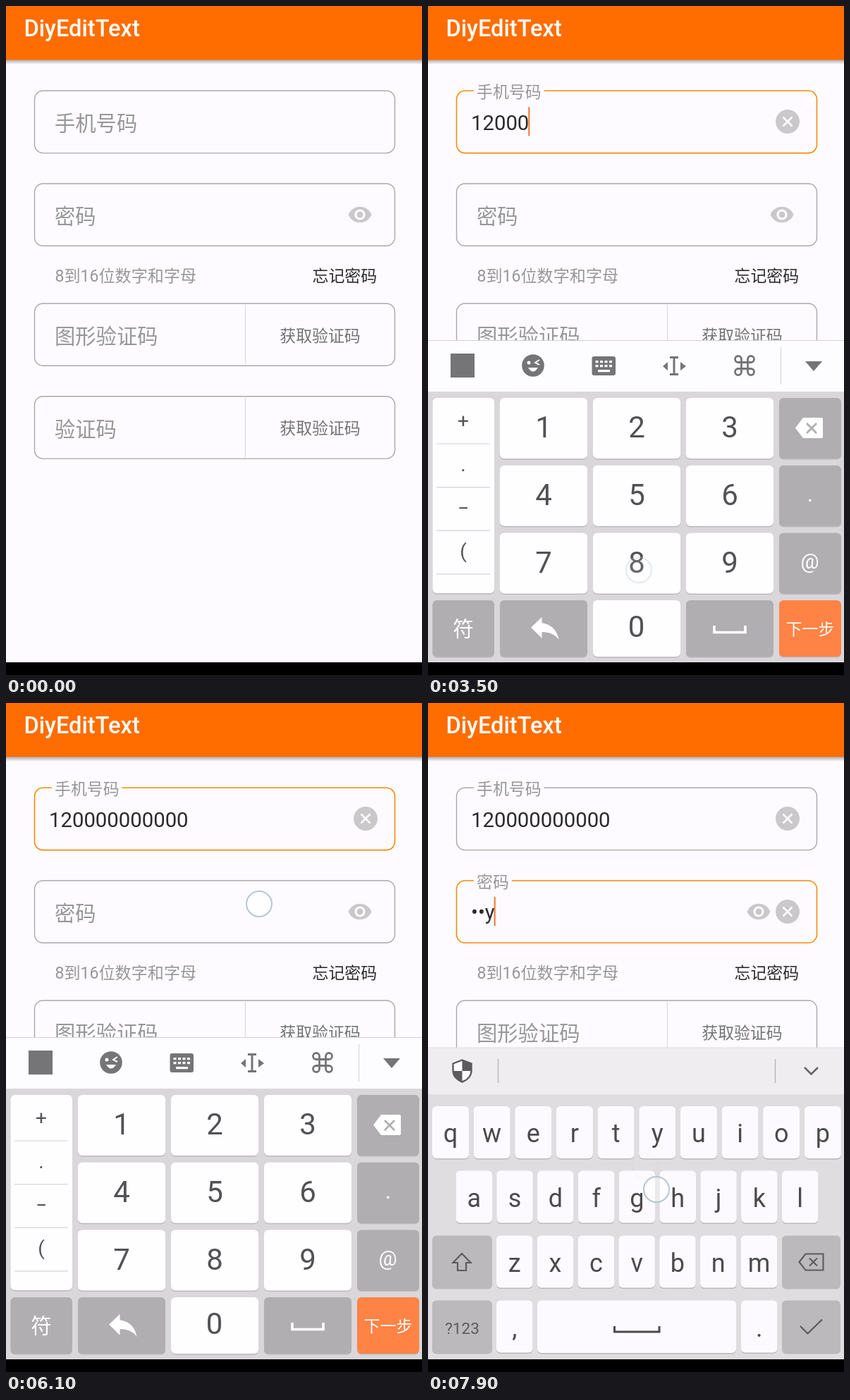
An HTML page for the animation above (8000 ms loop, 590 by 949 pixels).

```html
<!DOCTYPE html>
<html lang="zh-CN">
<head>
<meta charset="utf-8">
<title>DiyEditText</title>
<style>
html, body { margin: 0; width: 100%; height: 100%; overflow: hidden; background: #fdfbff; }
svg { display: block; width: 590px; height: 949px; font-family: Roboto, "Noto Sans CJK SC", "Noto Sans CJK", sans-serif; }
</style>
</head>
<body>
<svg id="stage" viewBox="0 0 590 949" xmlns="http://www.w3.org/2000/svg"></svg>
<script>
const LOOP = 8000, STEP = 100;
const PHONE = "120000000000";
const PAGE = "#fdfbff", LINE = "#a9a8aa", ACCENT = "#f58c0c", HINT = "#979698";
const BIG = 29.3, SMALL = 22.9;

// When each character appears
const phoneKeys = [1500, 2000, 2600, 2900, 3300, 3800, 4500, 4700, 4800, 5000, 5200, 5300];
const passKeys = [7100, 7400, 7600];
const PASS = ["k", "t", "y"];
const phoneFocus = 600, passFocus = 6300;

// Touches: time, x, y
const taps = [
  [300, 300, 166], [1400, 165, 611], [1900, 421, 611], [2500, 297, 798], [2800, 298, 802],
  [3200, 299, 800], [3700, 293, 806], [4400, 305, 812], [4600, 309, 816], [4800, 313, 820],
  [5200, 313, 820], [6000, 359, 285], [7000, 456, 622], [7300, 268, 640], [7500, 308, 657], [7900, 324, 690]
];
const fade = [1, 1, 0.65, 0.35, 0.07];

const rect = (x, y, w, h, fill, r = 0, more = "") =>
  `<rect x="${x}" y="${y}" width="${w}" height="${h}" rx="${r}" fill="${fill}" ${more}/>`;
const text = (s, x, y, size, fill, more = "") =>
  `<text x="${x}" y="${y}" font-size="${size}" fill="${fill}" ${more}>${s}</text>`;
const mid = (s, x, y, size, fill, more = "") => text(s, x, y, size, fill, `text-anchor="middle" ${more}`);
const line = (d, color, w, more = "") =>
  `<path d="${d}" fill="none" stroke="${color}" stroke-width="${w}" ${more}/>`;
const shape = (d, fill, more = "") => `<path d="${d}" fill="${fill}" ${more}/>`;
const key = (x, y, w, h, fill) => rect(x, y + 1.5, w, h, "#bbb9bd", 6) + rect(x, y, w, h, fill, 6);
const box = (y, more = "") => rect(40.5, y, 511, 88.3, "none", 12, `stroke="${LINE}" stroke-width="1.4" ${more}`);
const clearIcon = (y, id) => `<g id="${id}"><circle cx="510" cy="${y}" r="17" fill="#cac8cb"/>` +
  line(`M503.5 ${y - 6.5}l13 13m0-13l-13 13`, "#fff", 2.6) + "</g>";
const field = (name, y, label) => box(y, `id="${name}Box"`) +
  rect(65, y - 3, 0, 6, PAGE, 0, `id="${name}Gap"`) +
  text(label, 69, y + 57, BIG, HINT, `id="${name}Label"`) +
  text("", 61, y + 55.2, BIG, "#2b2a2c", `id="${name}Text"`) +
  rect(60, y + 23, 2, 41, "#ee7429", 0, `id="${name}Caret"`);
const codeField = (y, label) => box(y) + text(label, 69, y + 57, BIG, HINT) +
  line(`M339.5 ${y + 2}v84`, "#dbd9dd", 1.2) + mid("获取验证码", 445.5, y + 53.5, SMALL, "#737274");

function page() {
  const eye = "M12 4.5C7 4.5 2.73 7.61 1 12c1.73 4.39 6 7.5 11 7.5s9.27-3.11 11-7.5c-1.73-4.39-6-7.5-11-7.5z" +
    "M12 17c-2.76 0-5-2.24-5-5s2.24-5 5-5 5 2.24 5 5-2.24 5-5 5zm0-8c-1.66 0-3 1.34-3 3s1.34 3 3 3 3-1.34 3-3-1.34-3-3-3z";
  return `<defs><linearGradient id="shade" x2="0" y2="1"><stop stop-color="#a9a7aa"/><stop offset="1" stop-color="${PAGE}"/></linearGradient></defs>` +
    rect(0, 0, 590, 949, PAGE) + rect(0, 76, 590, 7, "url(#shade)") + rect(0, 0, 590, 76.5, "#ff6d00") +
    text("DiyEditText", 25.5, 43, 32.6, "#fff", 'font-weight="500"') +
    field("phone", 120.3, "手机号码") + clearIcon(164, "phoneClear") +
    field("pass", 252, "密码") + clearIcon(296, "passClear") +
    shape(eye, "#cac8cb", 'id="eye"') +
    text("8到16位数字和字母", 69.5, 390.5, 23.1, HINT) +
    text("忘记密码", 434.5, 390.5, SMALL, "#2b2a2c") +
    codeField(422, "图形验证码") + codeField(553.8, "验证码") +
    rect(0, 931, 590, 18, "#000");
}

function numberPad() {
  const ink = "#757476", grey = "#b0aeb1", white = "#fefdff";
  let s = rect(0, 474, 590, 73, "#fdfcff") + rect(0, 474, 590, 1, "#d3d1d4") + rect(0, 547, 590, 384, "#d9d7da");
  s += rect(32, 493, 34, 34, ink);
  s += `<circle cx="149" cy="510" r="15.8" fill="${ink}"/><circle cx="143" cy="506" r="2.5" fill="#fff"/>` +
    line("M158 502l-6 4 6 3", "#fff", 2) + shape("M142 513q7 11 14 0z", "#fff");
  s += rect(232.5, 497, 33.5, 27, ink, 3);
  for (let i = 0; i < 8; i++) s += rect(237.5 + i % 4 * 6.5, 503 + (i >> 2) * 6, 4, 3.2, "#fff");
  s += rect(241, 516, 17, 3.2, "#fff");
  s += line("M343 498.5h12m-6 0v24m-6 0h12", ink, 3) + shape("M340 505v12l-7-6zM358 505v12l8-6z", ink);
  s += line("M444.5 505.5h9v9h-9zv-4.5a4.5 4.5 0 1 0-4.5 4.5zM453.5 505.5h4.5a4.5 4.5 0 1 0-4.5-4.5z" +
    "M453.5 514.5v4.5a4.5 4.5 0 1 0 4.5-4.5zM444.5 514.5h-4.5a4.5 4.5 0 1 0 4.5 4.5z", ink, 2.8);
  s += line("M500.5 484v53", "#d9d7da", 1.2) + shape("M535 504h24l-12 14z", ink);

  s += key(6.5, 556, 87.5, 277, white);
  ["+", ".", "−", "("].forEach((c, i) => {
    s += mid(c, 50, [598, 660, 722, 783][i], 28, "#555456");
    s += line(`M12 ${621 + i * 61.6}h76`, "#d6d4d7", 1.2);
  });
  for (let i = 0; i < 9; i++) {
    const x = 102 + i % 3 * 132, y = 556 + Math.floor(i / 3) * 95.8;
    s += key(x, y, 124, 86, white) + mid(i + 1, x + 62, y + 56, 42, "#525153");
  }
  for (let i = 0; i < 3; i++) s += key(498, 556 + i * 95.8, 88, 86, grey);
  s += shape("M521 598.5l11-14.5h26q2 0 2 2v25q0 2-2 2h-26z", "#fff") + line("M537 592l14 14m0-14l-14 14", grey, 2.8);
  s += mid(".", 542, 703, 32, "#fff") + mid("@", 541.5, 798, 29, "#fff");
  s += key(6.5, 843, 87.5, 80, grey) + mid("符", 50, 894, 29.5, "#fff");
  s += key(102, 843, 124, 80, grey) +
    shape("M10 9V5l-7 7 7 7v-4.1c5 0 8.5 1.6 11 5.1-1-5-4-10-11-11z", "#fff", 'transform="translate(139.5 856) scale(2.2 2.15)"');
  s += key(234, 843, 124, 80, white) + mid("0", 295.5, 895, 42, "#525153");
  s += key(366, 843, 124, 80, grey) + line("M406 879v9.5h44v-9.5", "#fff", 3.6);
  s += key(498, 843, 88, 80, "#ff8345") + mid("下一步", 542, 892, 23, "#fff");
  return s;
}

function letterPad() {
  const ink = "#4b4a4c", grey = "#bbb9bc", white = "#fcfaff", dark = "#5c5b5d";
  const row = (chars, x, y, pitch, w) => [...chars].map((c, i) =>
    key(x + i * pitch, y, w, 74, white) + mid(c, x + i * pitch + w / 2, y + 51, 36, ink)).join("");
  let s = rect(0, 489, 590, 442, "#dfdde0") + rect(0, 489, 590, 66, "#efedf0") + rect(0, 488.5, 590, 1, "#dddbde");
  const shield = "M48.5 506.5l13 5v10c0 8-6 13.5-13 16-7-2.5-13-8-13-16v-10z";
  s += shape(shield, "#fff") + shape("M48.5 506.5v15.5h13v-10.5zM48.5 522h-13c0 8 6 13 13 15.5z", dark) +
    line(shield, dark, 2.4);
  s += line("M99.5 505v34M492.5 505v34", "#b5b3b6", 1.3) + line("M534 517l9.5 9.5 9.5-9.5", "#666567", 2.6);
  s += row("qwertyuiop", 6, 572, 58.65, 52) + row("asdfghjkl", 39.5, 663.5, 57.8, 51.5) + row("zxcvbnm", 97, 755.5, 57.8, 51.5);
  s += key(6, 755.5, 85, 74.5, grey) + line("M48 781l-12.5 13h6.5v11h12v-11h6.5z", dark, 2.2);
  s += key(502, 755.5, 83, 74.5, grey) + line("M526.5 793l9-11.5h25v23h-25zM541 787.5l11 11m0-11l-11 11", dark, 2.1);
  s += key(6, 847.5, 85, 74.5, grey) + mid("?123", 48.5, 894.5, 22.5, dark);
  s += row(",", 97, 847.5, 0, 51.5) + row(".", 444, 847.5, 0, 51.5);
  s += key(155, 847.5, 282, 74.5, white) + line("M264.5 884v8h63.5v-8", ink, 3);
  s += key(502, 847.5, 83, 74.5, grey) + line("M528 884l10.5 10.5 20.5-20", dark, 2.3);
  return s;
}

const stage = document.getElementById("stage");
stage.innerHTML = page() + `<g id="numbers">${numberPad()}</g><g id="letters">${letterPad()}</g>` +
  taps.map(([, x, y], i) => `<circle id="tap${i}" cx="${x}" cy="${y}" r="18" fill="#fff" fill-opacity=".35" stroke="#b4c6d3" stroke-width="2"/>`).join("");

const $ = id => document.getElementById(id);
const set = (id, attrs) => { for (const k in attrs) $(id).setAttribute(k, attrs[k]); };
const show = (id, on) => set(id, { visibility: on ? "visible" : "hidden" });
const ramp = (t, a, b) => Math.min(1, Math.max(0, (t - a) / (b - a)));
const easeOut = p => 1 - (1 - p) ** 2;
const typed = (keys, t) => keys.filter(k => k <= t).length;

function drawField(name, y, t, start, end, keys, value) {
  const lift = t < start ? 0 : ramp(t, start - 25, start + 142);
  const focused = t >= start && t < end;
  const size = BIG + (SMALL - BIG) * lift;
  set(name + "Box", { stroke: focused ? ACCENT : LINE, "stroke-width": focused ? 1.6 : 1.4 });
  set(name + "Label", { y: y + 46.5 - 45 * lift + size * 0.36, "font-size": size });
  set(name + "Gap", { width: t >= start ? $(name + "Label").getComputedTextLength() + 8 : 0 });
  $(name + "Text").textContent = value;
  const n = typed(keys, t);
  const since = t - (n ? keys[n - 1] : start);
  show(name + "Caret", focused && since % 1000 < 500);
  set(name + "Caret", { x: 60 + (value ? $(name + "Text").getComputedTextLength() : 0) });
  show(name + "Clear", n > 0);
}

function draw(t) {
  const n = typed(phoneKeys, t), m = typed(passKeys, t);
  drawField("phone", 120.3, t, phoneFocus, passFocus, phoneKeys, PHONE.slice(0, n));
  drawField("pass", 252, t, passFocus, LOOP, passKeys, m ? "•".repeat(m - 1) + PASS[m - 1] : "");
  set("eye", { transform: `translate(${m ? 451 : 484} 278) scale(1.5)` });

  const up = easeOut(ramp(t, 600, 950)), down = ramp(t, 6300, 6485);
  set("numbers", { transform: `translate(0 ${Math.round(474 * (1 - up + down))})` });
  show("numbers", up > 0 && down < 1);
  const letters = easeOut(ramp(t, 6600, 7000));
  set("letters", { transform: `translate(0 ${Math.round(460 * (1 - letters))})` });
  show("letters", letters > 0);

  taps.forEach(([at], i) => set("tap" + i, { opacity: t < at ? 0 : fade[Math.floor((t - at) / STEP)] || 0 }));
}

const begin = performance.now();
function tick() {
  const t = (performance.now() - begin) % LOOP;
  draw(Math.floor(t / STEP) * STEP);
  requestAnimationFrame(tick);
}
tick();
</script>
</body>
</html>
```
